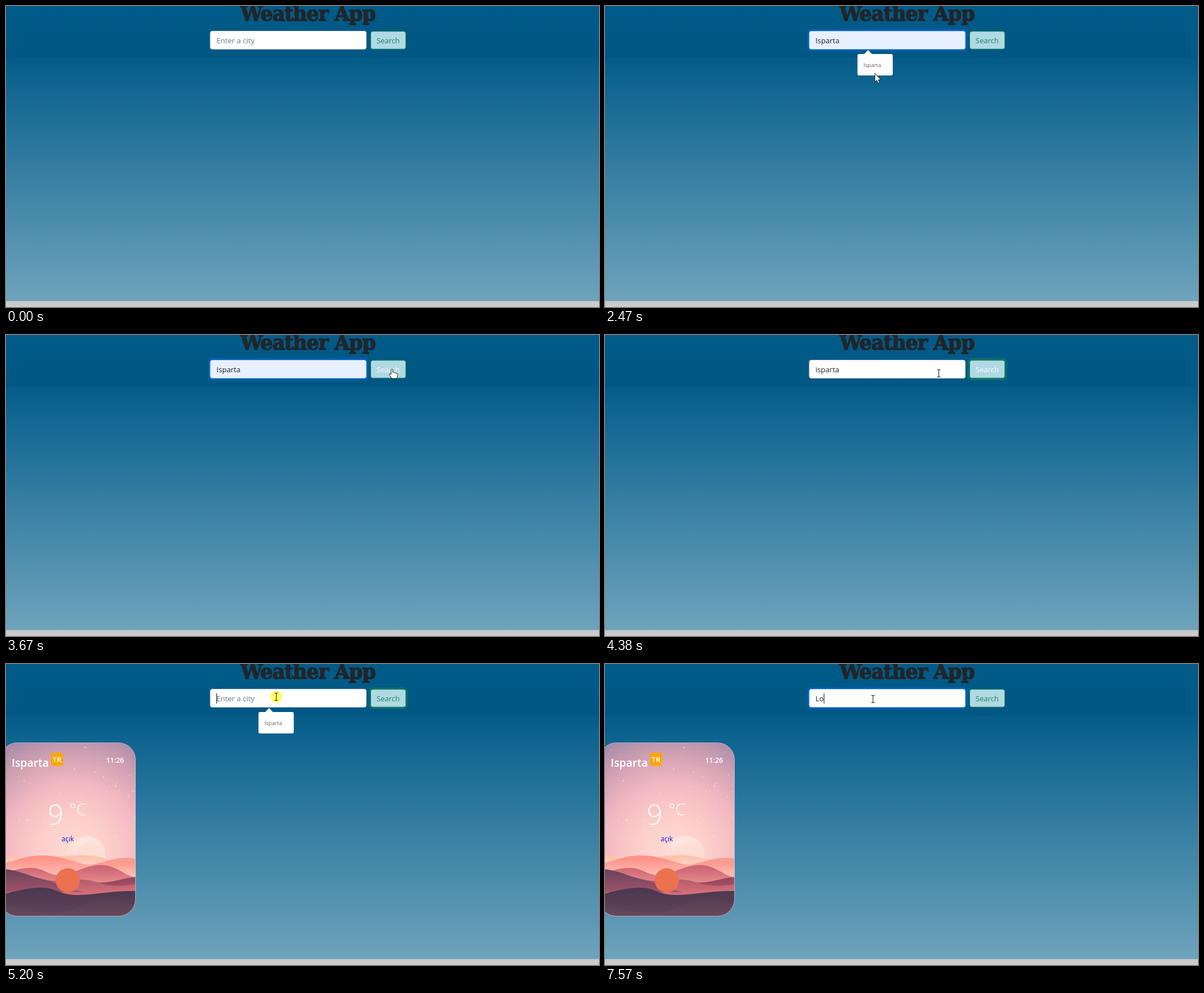
Recreate the animation shown at these times as an HTML page. Size 1051 px wide and 533 px high, loop 8000 ms.

```html
<!DOCTYPE html>
<html lang="en">
<head>
<meta charset="utf-8">
<title>Weather App</title>
<style>
  html, body { margin: 0; width: 100%; height: 100%; overflow: hidden; }
  svg { display: block; width: 100%; height: 100%; font-family: "Open Sans", "Noto Sans", sans-serif; }
  .title { font: bold 35px "DejaVu Serif", serif; letter-spacing: -1.2px; fill: #212529; stroke: #212529; stroke-width: 1.3px; }
  .field { font-size: 13.1px; }
  .card text { fill: #fff; font-weight: 600; }
  .card .thin { font-weight: 300; }
</style>
</head>
<body>
<svg viewBox="0 0 1051 533" preserveAspectRatio="none">
  <defs>
    <linearGradient id="page" x2="0" y2="1"><stop stop-color="#035b89"/><stop offset=".1" stop-color="#0f6490"/><stop offset="1" stop-color="#6ea3bb"/></linearGradient>
    <linearGradient id="head" x2="0" y2="1"><stop stop-color="#005b88"/><stop offset="1" stop-color="#005783"/></linearGradient>
    <radialGradient id="sky" gradientUnits="userSpaceOnUse" cx="120" cy="335" r="225">
      <stop stop-color="#ffddd4"/><stop offset=".3" stop-color="#fccdc9"/><stop offset=".55" stop-color="#f3b8c2"/>
      <stop offset=".8" stop-color="#cd9fb2"/><stop offset="1" stop-color="#a58aa8"/>
    </radialGradient>
    <linearGradient id="moon" x2="0" y2="1"><stop stop-color="#fde2d9"/><stop offset="1" stop-color="#fdd6cc"/></linearGradient>
    <clipPath id="frame"><rect x="-10" y="139.5" width="239.5" height="307" rx="30"/></clipPath>
  </defs>

  <rect width="1051" height="533" fill="#cbcbcb"/>
  <rect y="91" width="1051" height="431.5" fill="url(#page)"/>
  <rect width="1051" height="91" fill="url(#head)"/>
  <text class="title" x="535" y="26" text-anchor="middle">Weather App</text>

  <g id="card" class="card">
    <g clip-path="url(#frame)">
      <rect x="-10" y="139" width="240" height="308" fill="url(#sky)"/>
      <g id="stars" fill="#fff"></g>
      <circle cx="142.5" cy="338" r="34" fill="url(#moon)"/>
      <path d="M119 318a31 31 0 0 1 50 4a30 30 0 0 0-48 16z" fill="#fff" opacity=".15"/>
      <g id="hills"></g>
      <circle cx="109.5" cy="383" r="21.5" fill="#ec7150"/>
    </g>
    <rect x="-10" y="139.5" width="239.5" height="307" rx="30" fill="none" stroke="#d9c4cc" stroke-opacity=".7"/>
    <text x="10" y="182" font-size="19.4">Isparta</text>
    <rect x="80" y="157" width="21" height="23.5" rx="4" fill="#ffa500"/>
    <text x="90.5" y="174" font-size="13.3" text-anchor="middle">TR</text>
    <text x="177.5" y="175" font-size="12.4">11:26</text>
    <text class="thin" x="74" y="285" font-size="49">9</text>
    <text class="thin" x="112.5" y="268" font-size="28.5">°C</text>
    <text x="98.5" y="314" font-size="12" style="fill:#1414e6;font-weight:400">açık</text>
  </g>

  <rect id="inputRing" fill="#0d6efd"/>
  <rect id="input" x="362" y="44.5" width="276.5" height="32" rx="3.5"/>
  <text id="value" class="field" x="373" y="66"></text>
  <rect id="caret" x="373" y="52" width="1" height="18" fill="#111"/>

  <rect id="buttonRing" fill="#198754"/>
  <rect x="646.5" y="44.9" width="62" height="31.3" rx="3.5" fill="#b0d9e4" stroke="#198754"/>
  <text id="label" class="field" x="677.3" y="66" text-anchor="middle">Search</text>

  <g id="popup">
    <path d="M459 85.5L466.3 78L473.6 85.5z" fill="#fff"/>
    <rect x="447.5" y="85" width="62.5" height="38" rx="3" fill="#fff"/>
    <text x="458" y="108" font-size="9.7" fill="#5f6368">Isparta</text>
  </g>

  <g id="cursor">
    <circle id="press" r="10.5" fill="#ff0" opacity=".6"/>
    <path id="beam" d="M-3-6.5H-1L0-5.5L1-6.5H3M0-5.5V5.5M-3 6.5H-1L0 5.5L1 6.5H3" fill="none" stroke="#222" stroke-width="1.1"/>
    <path id="arrow" d="M0 0V15.2L3.4 12L5.8 17.2L8.2 16.2L5.9 11.2H10.8z" fill="#fff" stroke="#111" stroke-width=".9"/>
    <path id="hand" d="M-1.5 1Q0-1 1.5 1V6Q4 5 4.5 7Q7 6 7.5 8Q10 7.5 10 10V13Q9.5 15 8 17H0L-5 10Q-5 8-3 8.5L-1.5 10z" fill="#fff" stroke="#111" stroke-width=".9"/>
  </g>
</svg>

<script>
const LOOP = 8000;
const el = id => document.getElementById(id);
const show = (id, on) => el(id).setAttribute('display', on ? 'inline' : 'none');
const set = (id, attrs) => { for (const k in attrs) el(id).setAttribute(k, attrs[k]); };
const clamp = v => Math.min(1, Math.max(0, v));
const smooth = v => { v = clamp(v); return v * v * (3 - 2 * v); };
const within = (t, spans) => spans.some(([from, to]) => t >= from && t < to);
// 0..1 level that fades in at the start of each span and out after its end
const level = (t, spans, fade = 150) => Math.max(...spans.map(([from, to]) =>
  smooth((t - from) / fade) * (1 - smooth((t - to) / fade))));

// time, x, y of the pointer's hot spot
const path = [
  [80, 994, 528], [200, 860, 405], [350, 645, 190], [480, 546, 76], [560, 519, 53], [610, 518, 59],
  [1780, 518, 59], [1900, 512, 78], [2020, 499, 106], [2180, 488, 131],
  [2340, 488, 131], [2550, 472.5, 112.5],
  [2970, 472.5, 112.5], [3090, 502, 105], [3300, 594, 84], [3500, 663, 66], [3670, 684, 60],
  [4300, 684, 60], [4380, 592, 68], [4560, 520, 55], [4800, 488, 56], [5040, 479, 58],
  [5630, 479, 58], [6090, 475, 62], [LOOP, 475, 62]
];
// time, field text, autofill tint
const values = [
  [0, '', 0], [1960, 'Isparta', 1], [2100, '', 0], [2420, 'Isparta', 1],
  [3830, 'isparta', 0], [4700, '', 0], [7280, 'L', 0], [7480, 'Lo', 0]
];
const presses = [[860, 1010], [2800, 2970], [3810, 3960], [5160, 5310]];
const carets = [[860, 1780], [2970, 3470], [5160, 5660], [6960, LOOP]];
const inputFocus = [[920, 3830], [5200, LOOP]];
const buttonFocus = [[3830, 5165]];
const hover = [[3540, 4370]];
const popups = [[900, 2980], [5180, 7280]];

function pointAt(t) {
  const i = Math.max(1, path.findIndex(p => p[0] >= t));
  const [a, b] = [path[i - 1], path[i]];
  const k = clamp((t - a[0]) / (b[0] - a[0]));
  return [a[1] + (b[1] - a[1]) * k, a[2] + (b[2] - a[2]) * k];
}

function ring(id, x, y, w, h, k, alpha) {
  const s = 3.5 * k;
  set(id, { x: x - s, y: y - s, width: w + 2 * s, height: h + 2 * s, rx: 4 + s, opacity: alpha * k });
}

function render(t) {
  const [x, y] = pointAt(t);
  const inInput = x > 362 && x < 639 && y > 44 && y < 77;
  const onButton = x > 646 && x < 709 && y > 44 && y < 77;
  show('cursor', t >= 80);
  set('cursor', { transform: `translate(${x} ${y})` });
  show('beam', inInput);
  show('hand', onButton);
  show('arrow', !inInput && !onButton);
  show('press', within(t, presses));

  const [, text, tint] = values.filter(v => v[0] <= t).pop();
  const value = el('value');
  const shown = text || 'Enter a city';
  if (value.textContent !== shown) value.textContent = shown;
  set('value', { fill: text ? '#212529' : '#6c757d' });
  show('caret', within(t, carets));
  set('caret', { x: text ? 373 + value.getComputedTextLength() : 373 });

  const focus = level(t, inputFocus);
  ring('inputRing', 361.5, 44, 277.5, 33, focus, .32);
  set('input', { fill: tint ? '#e8f0fe' : '#fff', stroke: focus > .5 ? '#86b7fe' : '#ced4da' });
  ring('buttonRing', 646, 44.4, 63, 32.3, level(t, buttonFocus), .5);
  const h = level(t, hover);
  const mix = c => Math.round(c + (255 - c) * h);
  set('label', { fill: `rgb(${mix(25)},${mix(135)},${mix(84)})` });

  const fade = Math.max(...popups.map(([from, to]) => t < from ? 0 : clamp(1 - (t - to) / 170)));
  set('popup', { opacity: fade, transform: `translate(478.7 104) scale(${.95 + .05 * fade}) translate(-478.7 -104)` });
  show('popup', fade > 0);
  show('card', t >= 4700);
}

function addHill(i, curve, top, bottom, depth) {
  const y = +curve.match(/^-?\d+ (\d+)/)[1];
  el('hills').insertAdjacentHTML('beforeend', `
    <linearGradient id="hill${i}" gradientUnits="userSpaceOnUse" x1="0" x2="0" y1="${y - 8}" y2="${y + depth}">
      <stop stop-color="${top}"/><stop offset="1" stop-color="${bottom}"/></linearGradient>
    <path d="M${curve}V450H-10z" fill="url(#hill${i})"/>`);
}
[
  ['-10 335C20 340 35 347 65 345S115 337 145 339S200 354 230 350', '#fdb495', '#fed5c9', 24],
  ['120 360C160 358 185 343 212 343Q222 343 230 345', '#fa9c91', '#fdc4bb', 38],
  ['-10 353C10 352 30 340 58 339S105 344 130 352S195 360 230 358', '#fe938a', '#fed0c5', 34],
  ['-10 368C10 368 25 361 45 361S75 374 95 374S140 356 168 356S210 375 230 378', '#cc6676', '#f19c98', 32],
  ['70 395C110 386 130 386 160 387S205 379 230 377', '#9a4a60', '#d9737c', 26],
  ['-10 363C20 364 45 379 75 383S130 376 160 386S205 393 230 390', '#8d465d', '#d56f79', 42],
  ['-10 363C20 363 38 375 65 381S105 398 140 404H-10', '#574058', '#a8546a', 44],
  ['-10 408C15 404 35 396 62 396S95 409 125 409S190 401 230 402', '#4b3851', '#664659', 46],
  ['-10 425C20 430 45 441 85 441S140 417 180 417Q210 417 230 429', '#573f55', '#694a5c', 26]
].forEach((hill, i) => addHill(i, ...hill));

let seed = 11;
const random = () => (seed = seed * 16807 % 2147483647) / 2147483647;
for (let i = 0; i < 46; i++) {
  const [cx, cy, r, o] = [random() * 228, 144 + random() * 165, .5 + random() * .7, .35 + random() * .5];
  el('stars').insertAdjacentHTML('beforeend', `<circle cx="${cx}" cy="${cy}" r="${r}" opacity="${o}"/>`);
}

const start = performance.now();
function tick() {
  render((performance.now() - start) % LOOP);
  requestAnimationFrame(tick);
}
tick();
</script>
</body>
</html>
```
